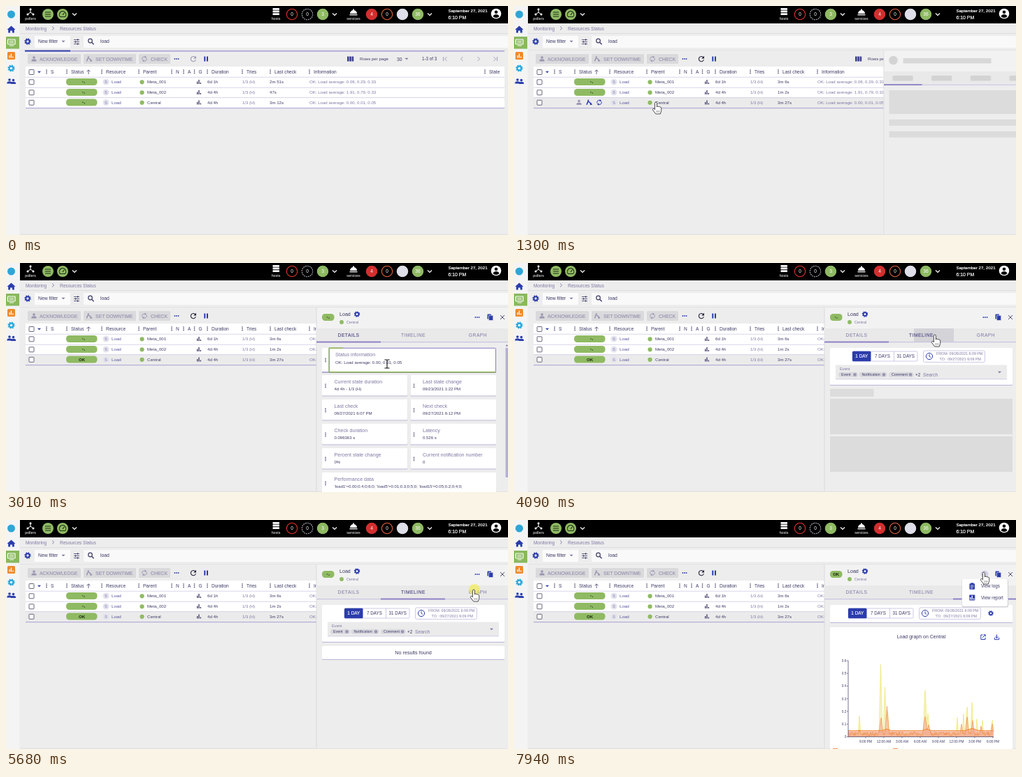
An HTML page that plays this animation: 718x329 px, repeating every 8000 ms.

```html
<!DOCTYPE html>
<html lang="en">
<head>
<meta charset="utf-8">
<title>Resources Status</title>
<style>
  html, body { margin: 0; width: 100%; height: 100%; overflow: hidden; background: #ededed; }
  svg { display: block; width: 718px; height: 329px; }
  text { font-family: "Liberation Sans", Arial, sans-serif; white-space: pre; }
  .loop { animation: 8s linear infinite; }
  .drawer { animation-name: drawer; }
  .underline { animation-name: underline; }
  .progress { animation-name: progress; }
  .cursor { animation-name: cursor; animation-timing-function: ease-in-out; }
  @keyframes drawer {
    0% { transform: translateX(280px); }
    15.31% { transform: translateX(274px); animation-timing-function: cubic-bezier(0, 0, .2, 1); }
    18.12%, 100% { transform: none; }
  }
  @keyframes underline {
    0%, 51.6% { transform: none; animation-timing-function: ease-in-out; }
    55%, 72.8% { transform: translateX(92px); animation-timing-function: ease-in-out; }
    76.3%, 100% { transform: translateX(184px); }
  }
  @keyframes progress {
    0%, .87% { transform: none; }
    5%, 100% { transform: translateX(560px); }
  }
</style>
</head>
<body>
<svg id="stage" viewBox="0 0 718 329" xmlns="http://www.w3.org/2000/svg"></svg>
<script>
const LOOP = 8000;
const ink = '#3c3b66', soft = '#7d79a3', blue = '#2b3cab', green = '#8fba63',
      grey = '#dcdcdc', mute = '#9a97b2', violet = '#8779c2', pale = '#c9c3e2';

// Times at which each layer switches on, off, on ...
const spans = {
  stale: [0, 400], fresh: [400, LOOP],
  rowHover: [820, LOOP], rowActions: [820, 1960], rowPill: [0, 820, 1960, LOOP],
  skeleton: [1100, 1780], panel: [1780, LOOP], panelMark: [1780, 7730], panelOk: [7730, LOOP],
  details: [1780, 3900], cardHover: [2880, 3560],
  timeline: [3900, 5820], waiting: [3900, 4370], empty: [4370, 5820], ripple: [3900, 4230],
  graph: [5820, LOOP], chart: [5960, LOOP], chartWait: [5820, 5960],
  menu: [7760, LOOP],
  arrow: [70, 890, 1980, 2900, 3550, 3760, 6480, 6900],
  hand: [890, 1980, 3760, 6480, 6900, LOOP], beam: [2900, 3550],
  click: [1100, 1240, 3840, 3960, 5680, 5860, 7720, 7860]
};
const path = [
  [0, 330, 335], [70, 330, 320], [820, 203, 139], [1910, 203, 139], [2250, 300, 172],
  [2670, 443, 181], [2740, 446, 176], [3010, 545, 145], [3480, 545, 145], [3850, 602, 104],
  [4300, 602, 104], [5060, 668, 102], [5200, 669, 101], [5820, 669, 101], [6130, 665, 93],
  [6520, 665, 92], [7000, 672, 76], [LOOP, 672, 76]
];

const pct = t => (t / LOOP * 100).toFixed(3) + '%';
const blink = ([name, times]) => `@keyframes ${name}{0%{opacity:0}` +
  times.map((t, i) => `${pct(t)}{opacity:${1 - i % 2}}`).join('') + '}';
const css = document.createElement('style');
css.textContent = Object.entries(spans).map(blink).join('\n') +
  '@keyframes cursor{' + path.map(([t, x, y]) => `${pct(t)}{transform:translate(${x}px,${y}px)}`).join('') + '}';
document.head.append(css);

// Drawing helpers
const layer = (name, ...parts) =>
  `<g class="loop" style="animation-name:${name};animation-timing-function:step-end">${parts.join('')}</g>`;
const text = (x, y, s, size = 6.1, fill = ink, more = '') =>
  `<text x="${x}" y="${y}" font-size="${size}" fill="${fill}" ${more}>${s}</text>`;
const mid = (x, y, s, size, fill, more = '') => text(x, y, s, size, fill, 'text-anchor="middle" ' + more);
const rect = (x, y, w, h, fill, more = '') =>
  `<rect x="${x}" y="${y}" width="${w}" height="${h}" fill="${fill}" ${more}/>`;
const round = r => `rx="${r}"`;
const disc = (x, y, r, fill, more = '') => `<circle cx="${x}" cy="${y}" r="${r}" fill="${fill}" ${more}/>`;
const line = (d, stroke, w = 1, more = '') => `<path d="${d}" fill="none" stroke="${stroke}" stroke-width="${w}" ${more}/>`;
const shape = (d, fill, more = '') => `<path d="${d}" fill="${fill}" ${more}/>`;
const card = (x, y, w, h) => rect(x, y + .9, w, h, '#bdb6d8', round(1.5)) + rect(x, y, w, h, '#fff', round(1.5));

// Icons
const dots = (x, y, fill = ink) => [-2.3, 0, 2.3].map(d => disc(x, y + d, .8, fill)).join('');
const more = (x, y) => [-2.6, 0, 2.6].map(d => disc(x + d, y, .9, blue)).join('');
const gear = (x, y, fill = blue, r = 1) => disc(x, y, 2.4 * r, 'none', `stroke="${fill}" stroke-width="${1.8 * r}"`) +
  disc(x, y, 3.6 * r, 'none', `stroke="${fill}" stroke-width="${1.3 * r}" stroke-dasharray="${1.5 * r} ${1.33 * r}"`);
const chevron = x => line(`M${x - 3} 10.5l3 3 3-3`, '#fff', 1.2);
const caret = (x, y, fill = ink) => shape(`M${x - 2.6} ${y - 1.3}h5.2l-2.6 2.6z`, fill);
const person = (x, y, fill) => disc(x, y - 2, 1.8, fill) + shape(`M${x - 3.6} ${y + 3.4}v-1c0-3 7.2-3 7.2 0v1z`, fill);
const refresh = (x, y, fill) => line(`M${x + 2.6} ${y - 2.4}a3.6 3.6 0 1 0 .8 3.6`, fill, 1.1) +
  shape(`M${x + 4} ${y - 4.2}v3.8h-3.8z`, fill);
const sync = (x, y, fill) => line(`M${x - 3} ${y + 1.2}a3 3 0 0 1 4.6-3.6M${x + 3} ${y - 1.2}a3 3 0 0 1-4.6 3.6`, fill, 1) +
  shape(`M${x + .6} ${y - 4.4}l2.6 1.9-2.6 1.5zM${x - .6} ${y + 4.4}l-2.6-1.9 2.6-1.5z`, fill);
const dig = (x, y, fill) => disc(x - 1.2, y - 3, 1, fill) + line(`M${x - 3.6} ${y + 3.4}l2-5 3 2 1 3`, fill, 1.5) +
  shape(`M${x + 1} ${y + 3.5}l2-3 1.4 3z`, fill);
const bars = (x, y, fill) => rect(x - 3, y - .5, 1.3, 3.5, fill) + rect(x - .7, y - 3, 1.3, 6, fill) + rect(x + 1.7, y + 1, 1.3, 2, fill);
const box = (x, y) => rect(x - 3.5, y - 3.5, 7, 7, '#fff', `${round(.8)} stroke="#55556e" stroke-width=".9"`);
const pill = (x, y, w) => rect(x, y - 5, w, 10, green, round(4.5));
const mark = (x, y) => rect(x - 1.2, y - .6, 1.5, 1, '#26331a') + rect(x + 1.3, y + .6, 1.5, 1, '#26331a');
const ok = (x, y) => mid(x, y, 'OK', 6, '#16200c', 'font-weight="bold"');
const clock = x => disc(x, 134, 4.6, 'none', `stroke="${blue}"`) + line(`M${x} 131v3.2l2.2 1.4`, blue, .9);

function frame() {
  const badge = (x, s, fill, stroke, dash = '') => disc(x, 12, 7.7, fill, `stroke="${stroke}" stroke-width="1.1" ${dash}`) +
    mid(x, 14.4, s, 6.6, '#fff');
  return rect(0, 0, 718, 329, '#ededed') + rect(20, 0, 698, 25, '#000') + rect(0, 0, 19.5, 329, '#f4f4f4') +
    disc(7.5, 12, 5.5, '#2fa6d6') +
    shape('M1.5 34l6-5.6 6 5.6h-1.7v4.6H9v-3H6v3H3.2V34z', blue) +
    rect(0, 44, 19, 17.5, '#88b95c') + rect(2.5, 48, 10.5, 7, 'none', `${round(.8)} stroke="#fff" stroke-width="1.2"`) +
    line('M4.5 50.5h6.500M4.5 52.7h6.500M5 57h6', '#fff', .9) +
    rect(2, 66, 11, 11, '#ee8a2b', round(1.5)) + bars(7.5, 71.5, '#fff') +
    gear(7.5, 89.5, '#2aa9dc', 1.2) + person(5, 108, blue) + person(10.5, 108.5, blue) +
    line('M35 5v4M35 9l-4 3M35 9l4 3', '#fff', 1) + disc(35, 4.8, 1.5, '#fff') + disc(31, 12, 1.5, '#fff') + disc(39, 12, 1.5, '#fff') +
    mid(35, 20, 'pollers', 5.3, '#fff') +
    disc(60, 12, 8, green) + line('M56 9h8M56 12h8M56 15h8', '#1f2b16', 1) +
    disc(81, 12, 8, green) + line('M77.5 15.5a4.7 4.7 0 1 1 7 0zM81 13l2.2-3', '#1f2b16', 1.1) + chevron(98) +
    [3, 6.6, 10.2].map(y => rect(381.5, y, 9.5, 2.7, '#fff', round(.5))).join('') + mid(386, 20, 'hosts', 5.3, '#fff') +
    badge(409, '0', '#000', '#e2342f') + badge(431, '0', '#000', '#a9a9b4', 'stroke-dasharray="2 1"') +
    badge(453, '3', green, green) + chevron(470) +
    shape('M492 11a5 5 0 0 1 10 0z', '#fff') + rect(491.5, 12, 11, 1.3, '#fff') + disc(497, 5.3, 1, '#fff') +
    mid(497, 20, 'services', 5.3, '#fff') +
    badge(523, '4', '#d32f2f', '#d32f2f') + badge(545, '0', '#000', '#e0643a') + badge(567, '', '#dfdfe9', '#dfdfe9') +
    badge(589, '36', green, green) + chevron(606) +
    text(632.5, 8.7, 'September 27, 2021', 6.2, '#fff', 'stroke="#fff" stroke-width=".2"') +
    text(632.5, 18.7, '6:10 PM', 6.9, '#fff', 'stroke="#fff" stroke-width=".2"') +
    disc(701, 11, 7.3, '#fff') + disc(701, 8.8, 2.3, '#000') + shape('M696.5 15c1-4 8-4 9 0a6 6 0 0 1-9 0z', '#000') +
    text(28, 34.5, 'Monitoring', 6.45, soft) + line('M66 29.5l2.7 2.5-2.7 2.5', soft, .9) + text(77, 34.5, 'Resources Status', 6.55, soft) +
    rect(20, 39, 698, .8, '#dadade') + gear(31, 51, blue, 1.1) +
    rect(41, 43, 51, 17, '#fbfbfb', round(1)) + text(46, 53.3, 'New filter', 6.8) + caret(82, 51, soft) +
    line('M97 48.5h8M97 51.5h8M97 54.5h8M102.5 47v3M99.5 50v3M102.5 53v3', ink, .8) +
    rect(111, 43, 607, 17, '#f9f9f9', round(1)) + disc(120.5, 50, 2.8, 'none', `stroke="${ink}" stroke-width="1.2"`) +
    line('M122.6 52.2l3 3', ink, 1.4) + text(135, 53.3, 'load', 6.8) + rect(20, 63.4, 698, .7, '#dcdce2') +
    rect(20, 327.8, 698, .8, '#dadade');
}

function toolbar() {
  const button = (x, w, s) => rect(x, 69, w, 14, '#dadadc', round(1.5)) + text(x + 17, 78.7, s, 6.9, mute, `stroke="${mute}" stroke-width=".2"`);
  return button(31, 76, 'ACKNOWLEDGE') + person(40, 76, mute) + button(111, 75, 'SET DOWNTIME') + dig(119, 76, mute) +
    button(190, 45, 'CHECK') + sync(198, 76, mute) + more(244, 76) +
    layer('stale', refresh(268, 76, mute), rect(27, 64, 686, 1.5, '#aaa3d8'),
      `<svg x="27" y="63.500" width="686" height="2">${rect(0, 0, 65, 2, '#3340ab', 'class="loop progress"')}</svg>`) +
    layer('fresh', refresh(268, 76, '#22223c')) +
    rect(283.3, 72.5, 2, 7, blue) + rect(287, 72.5, 2, 7, blue) +
    [488, 491.3, 494.6].map(x => rect(x, 72.5, 2.6, 7, '#3b3f8f')).join('') +
    text(506, 78.2, 'Rows per page', 6.1) + text(559, 78.5, '30', 6.8) + caret(573, 76, soft) + text(595, 78.2, '1-3 of 3', 6.3) +
    line('M625.5 73v6M630.5 73l-3 3 3 3M653.5 73l-3 3 3 3M674.5 73l3 3-3 3M697.5 73l3 3-3 3M702.5 73v6', mute, .9);
}

function table() {
  const cols = [[58, 'S'], [87, 'Status'], [137, 'Resource'], [190, 'Parent'], [237, 'N'], [254, 'A'], [269.5, 'G'],
    [288, 'Duration'], [338, 'Tries'], [378, 'Last check'], [434, 'Information'], [685, 'State']];
  const rows = [['Meta_001', '6d 1h', '2m 51s', '3m 6s', '0.08, 0.29, 0.33'],
    ['Meta_002', '4d 4h', '47s', '1m 2s', '1.91, 0.79, 0.33'], ['Central', '4d 4h', '3m 12s', '3m 27s', '0.00, 0.01, 0.05']];
  let out = rect(28, 87, 685, 60, '#fff') + box(36.5, 95) + caret(47.5, 95, blue) + line('M118 98v-6M115.5 94.3l2.5-2.5 2.5 2.5', ink, .8);
  out += cols.map(([x, s]) => dots(x, 94.3) + text(x + 6, 96.7, s, 6.55)).join('');
  out += layer('rowHover', rect(28, 131.5, 685, 15, '#ebebeb'));
  rows.forEach(([name, age, old, now, load], i) => {
    const y = [109, 124, 138.5][i], b = y + 2.1;
    const status = pill(86, y, 44.5) + mark(110.2, y);
    out += rect(28, y - 7.2, 685, .8, '#cfcae4') + box(36.5, y + .3) + disc(143, y, 4.6, '#e4e4f0') + mid(143, b, 'S', 5.8, soft) +
      text(151, b, 'Load', 6.2, '#55539f') + disc(194.5, y + .3, 3.1, green) + text(202, b, name) + bars(276, y, ink) +
      text(288, b, age) + text(338, b, '1/3 (H)', 6, soft) +
      layer('stale', text(377, b, old)) + layer('fresh', text(377, b, now)) + text(434, b, 'OK: Load average: ' + load, 6.1, soft);
    out += i < 2 ? status : layer('rowPill', layer('stale', status), layer('fresh', pill(86, y, 44.5), ok(108.5, b))) +
      layer('rowActions', person(93, y, mute), dig(107.5, y, blue), sync(122, y, blue));
  });
  return out + rect(28, 146.2, 685, 1, '#a79dd0');
}

function skeleton() {
  const x = 444, tabs = [0, 1, 2, 3, 4].map(i => rect(x + 13 + i * 55.7, 100, 29, 7.5, '#d3d3d3', round(1))).join('');
  return rect(x, 94, 274, 19, '#e9e9e9') + disc(x + 14, 78, 6.3, '#d3d3d3') + rect(x + 28, 75, 126, 7.5, '#d8d8d8', round(1)) + tabs +
    rect(x, 112.8, 274, 1, pale) + rect(x, 112.3, 55, 1.7, violet) +
    rect(x + 8, 121, 258, 34, grey) + rect(x + 8, 163, 258, 9, grey) + rect(x + 8, 180, 258, 9, grey);
}

function details() {
  const info = (x, y, w, title, value) => card(x, y, w, 29.5) + dots(x + 5, y + 15.5) +
    text(x + 17.5, y + 11.5, title, 7.1, soft) + text(x + 17.5, y + 21.5, value, 6);
  const pairs = [['Current state duration', '4d 4h - 1/3 (H)', 'Last state change', '09/23/2021 1:22 PM'],
    ['Last check', '09/27/2021 6:07 PM', 'Next check', '09/27/2021 6:12 PM'],
    ['Check duration', '0.096363 s', 'Latency', '0.526 s'],
    ['Percent state change', '0%', 'Current notification number', '0']];
  return card(452, 122, 249, 34.5) + rect(452, 156.5, 249, .9, violet) + dots(457, 139.5) +
    layer('cardHover', rect(462.2, 122.3, 238.3, 34.4, 'none', `${round(1)} stroke="${violet}"`),
      line('M700.5 156.7H462.2V122.3h20', '#8bb04e', 1.4)) +
    text(471, 134, 'Status information', 7.1, soft) + text(471, 145.3, 'OK: Load average: 0.00, 0.01, 0.05', 6.1) +
    pairs.map(([a, b, c, d], i) => info(452, 161 + i * 35, 122.5, a, b) + info(578.5, 161 + i * 35, 122.5, c, d)).join('') +
    info(452, 301, 249, 'Performance data', "'load1'=0.00;0.4;0;6;0; 'load5'=0.01;0.3;0;5;0; 'load15'=0.05;0.2;0;4;0;") +
    rect(714.5, 122, 3.5, 186, '#b6afd6') + shape('M714.5 119.5l1.8-2.5 1.7 2.5z', soft);
}

// Period buttons and date range; x is the left edge of the buttons
function period(x) {
  return rect(x, 127, 93, 14, '#fff', `${round(1.5)} stroke="${pale}" stroke-width=".9"`) + rect(x, 126.7, 26.5, 14.6, blue, round(1.5)) +
    line(`M${x + 59.5} 127v14`, pale, .9) + mid(x + 13.3, 136.3, '1 DAY', 6.4, '#fff', 'stroke="#fff" stroke-width=".15"') +
    mid(x + 43, 136.3, '7 DAYS', 6.3, ink) + mid(x + 76.3, 136.3, '31 DAYS', 6.3, ink) +
    rect(x + 101.5, 126, 88, 16.5, '#fff', `${round(2)} stroke="${pale}" stroke-width=".9"`) + clock(x + 110) +
    text(x + 120, 131.5, 'FROM: 09/26/2021 6:09 PM', 5.3, soft) + text(x + 124.5, 139.5, 'TO:  09/27/2021 6:09 PM', 5.3, soft);
}

function timeline() {
  const chip = (x, w, s) => rect(x, 156.7, w, 7.3, '#d9d9df', round(3.6)) + text(x + 4, 162.3, s, 5.3) + disc(x + w - 4.5, 160.4, 2.4, mute);
  return card(452, 122, 261, 53) + period(484) + rect(460, 146.5, 245, 20.5, '#ebebeb', round(1)) + rect(460, 166.5, 245, .8, pale) +
    text(466, 154, 'Event', 5.7, soft) + chip(464, 28, 'Event') + chip(493.5, 40, 'Notification') + chip(536, 35.5, 'Comment') +
    text(574, 162.7, '+2', 6.4) + text(585, 162.7, 'Search', 6.7, soft) + caret(694.5, 157, soft) +
    layer('waiting', rect(452, 181, 62.5, 11, grey, round(1)), rect(452, 195, 261, 51, grey), rect(452, 249, 261, 51, grey)) +
    layer('empty', card(452, 181, 261, 19), mid(582.5, 193, 'No results found', 7.2, ink));
}

function chart() {
  const y = v => 311.5 - v * 182.5;
  let seed = 7;
  const rand = () => (seed = seed * 16807 % 2147483647) / 2147483647;
  // Each peak: centre, height, half width
  const curve = (peaks, base, noise) => {
    let d = '';
    for (let x = 478; x <= 686; x += .75) {
      const top = Math.max(0, ...peaks.map(([c, h, w]) => h * (1 - Math.abs(x - c) / w)));
      d += `L${x} ${y(Math.max(top, base + rand() * noise)).toFixed(1)}`;
    }
    return 'M' + d.slice(1);
  };
  const fast = curve([[494, .19, 1.8], [524.5, .57, 2.5], [530.5, .39, 2.5], [534, .22, 3], [588, .4, 3], [592, .18, 3],
    [634, .15, 2], [643, .18, 2], [648, .26, 2.5], [655, .27, 2], [662, .16, 2], [670, .13, 2], [684, .15, 2]], 0, .04);
  const slow = curve([[494, .06, 3], [525, .16, 3.5], [533.5, .24, 3.5], [588, .17, 4], [593, .1, 4], [640, .1, 3],
    [648, .17, 3], [656, .14, 3], [668, .09, 3], [684, .11, 3]], .005, .035);
  const steady = curve([[533, .062, 30], [590, .062, 30], [655, .066, 40]], .048, .002);
  const area = (d, fill, o) => shape(d + 'V311.500H478z', fill, `fill-opacity="${o}"`);
  const hours = ['9:00 PM', '12:00 AM', '3:00 AM', '6:00 AM', '9:00 AM', '12:00 PM', '3:00 PM', '6:00 PM'];
  let out = card(452, 154, 261, 180) + mid(582.5, 170.3, 'Load graph on Central', 7, ink) +
    line('M670.5 165h-2.7v6.5h6.3v-2.7M671.5 164.8h2.7v2.7M674 165l-3.8 3.8', blue, 1) +
    line('M690.5 164.5v5M688.2 167.5l2.3 2.3 2.3-2.3M687.3 169v2.7h6.4V169', blue, 1);
  out += area(fast, '#f3efbd', .8) + line(fast, '#f6f06c', .8) + line(fast, '#c9c9c2', .3, 'stroke-dasharray="1 1.5"') +
    area(slow, '#f4a98c', .55) + area(steady, '#f4a98c', .7) + line(slow, '#ef8744', .6) + line(steady, '#f08326', 1);
  out += line('M478 202v109.5h208', ink, .7);
  for (let i = 0; i <= 6; i++) out += line(`M476 ${y(i / 10)}h2`, ink, .6) +
    text(475.5, y(i / 10) + 1.8, i ? '0.' + i : '0', 4.8, ink, 'text-anchor="end"');
  out += hours.map((h, i) => line(`M${503 + i * 26} 311.500v2`, ink, .6) + mid(503 + i * 26, 320, h, 4.9, ink)).join('');
  return out + rect(456, 328, 7, 1, '#f3925c') + rect(542, 328, 7, 1, '#f3925c');
}

function graph() {
  return card(452, 122, 261, 25) + period(478) + gear(682, 134, blue, .9) +
    layer('chartWait', rect(452, 154, 261, 175, grey)) + layer('chart', chart());
}

function panel() {
  const tab = (x, s, shown) => mid(x, 105.8, s, 6.7, soft, 'letter-spacing=".5"') +
    layer(shown, mid(x, 105.8, s, 6.7, '#625d92', 'letter-spacing=".5"'));
  return rect(444, 64, 274, 264, '#ededed') + rect(444, 64, 274, 30, '#f2f2f2') + rect(443.6, 64, .8, 264, '#d4d4da') +
    layer('skeleton', skeleton()) +
    layer('panel', rect(444, 94, 274, 19, '#e9e9e9'), pill(452, 78, 17.5),
      layer('panelMark', mark(460, 78)), layer('panelOk', ok(460.7, 80)),
      text(477, 76, 'Load', 7.1), gear(502, 73.6), disc(480, 85, 2.9, green), text(487, 87, 'Central', 5.3, soft),
      more(674, 78), rect(688.5, 73.5, 5.5, 7, blue, round(.6)), rect(690.5, 75.3, 6.2, 7.2, blue, `${round(.6)} stroke="#ededed" stroke-width=".7"`),
      line('M707 75l6 6M713 75l-6 6', ink, .9),
      layer('ripple', rect(572, 94, 57, 19, '#d3d3d8')),
      tab(490, 'DETAILS', 'details'), tab(582.5, 'TIMELINE', 'timeline'), tab(675, 'GRAPH', 'graph'),
      rect(444, 113, 274, 1.2, pale), rect(444, 112.6, 92, 1.8, violet, 'class="loop underline"'),
      layer('details', details()), layer('timeline', timeline()), layer('graph', graph()),
      layer('menu', disc(673, 78, 5.5, '#d3cfe3'), rect(640.5, 85.5, 66.5, 40, '#cfcfd6', round(2)), rect(641, 85, 65, 39, '#fff', round(2)),
        rect(651.5, 91.3, 7.5, 8.5, blue, round(.8)), rect(653.5, 90.3, 3.5, 2, blue), line('M653 94h4.5M653 96h4.5M653 98h3', '#fff', .7),
        text(668, 97.3, 'View logs', 6.3), rect(651.3, 107.5, 8, 8, blue, round(.8)), bars(655.3, 111.5, '#fff'), text(668, 113.8, 'View report', 6.3)));
}

function cursor() {
  const edge = 'stroke="#222" stroke-width=".8" stroke-linejoin="round"';
  const hand = 'M-1.6.6a1.5 1.5 0 0 1 3 0V6l.1-.3a1.3 1.3 0 0 1 2.4.2a1.2 1.2 0 0 1 2.1.6a1.1 1.1 0 0 1 1.7.9V11.5L6.3 16H-.3L-4.6 10.2a1.4 1.4 0 0 1 2-1.6L-1.6 9.8z';
  return `<g class="loop cursor">${layer('click', disc(1, -1, 8, '#f4ec3c', 'fill-opacity=".6"'))}` +
    layer('arrow', shape('M0 0v12l2.8-2.6 2 4.6 1.9-.8-2-4.5h3.8z', '#fff', edge)) +
    layer('hand', shape(hand, '#fff', edge), line('M.8 11v3M2.8 11v3M4.7 11v3', '#444', .5)) +
    layer('beam', line('M-3.5-6h2.5q1 0 1 1V5q0 1-1 1h-2.5M3.5-6H1q-1 0-1 1M3.5 6H1q-1 0-1-1', '#111', 1.1)) + '</g>';
}

document.getElementById('stage').innerHTML =
  frame() + toolbar() + table() + `<g class="loop drawer">${panel()}</g>` + cursor();
</script>
</body>
</html>
```
